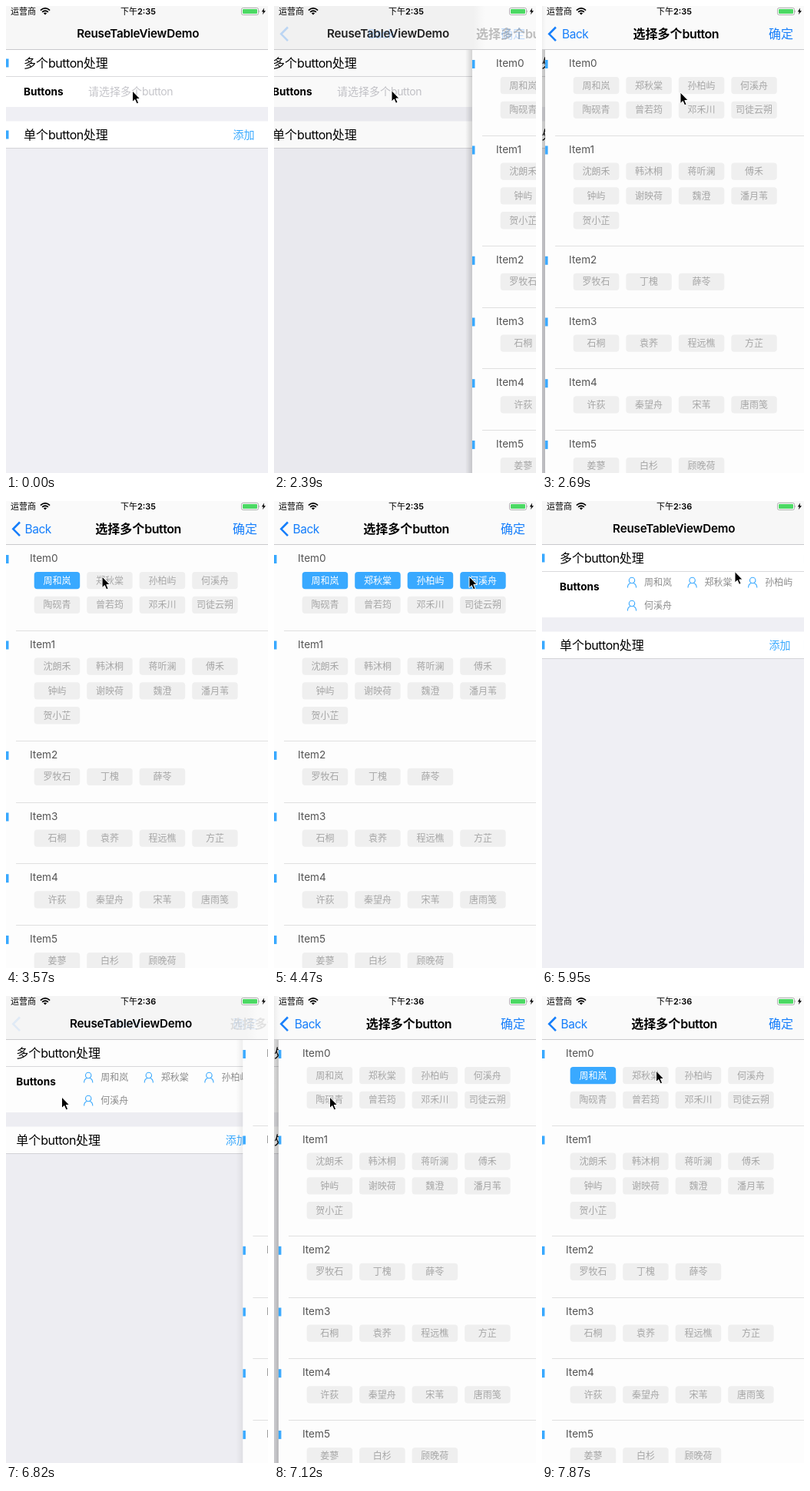
Write an HTML page that moves like this. It is 341 by 606 pixels and loops after 8 s.

```html
<!DOCTYPE html>
<html lang="zh-CN">
<head>
<meta charset="utf-8">
<title>ReuseTableViewDemo</title>
<style>
  html, body { margin: 0; width: 100%; height: 100%; overflow: hidden; background: #efeff4; }
  svg { display: block; width: 100vw; height: 100vh; }
  text { font-family: Inter, "Noto Sans CJK SC", "Noto Sans CJK", sans-serif; white-space: pre; }
  .tight { letter-spacing: -.03em; }
  .chip rect { fill: #efefef; }
  .chip text { fill: #a6a6a6; }
  .chip.on rect { fill: #39a9ff; }
  .chip.on text { fill: #fff; }
</style>
</head>
<body>
<svg id="stage" viewBox="0 0 341 606" preserveAspectRatio="none"></svg>
<script>
const W = 341, H = 606, LOOP = 8000;
const SKY = '#39a9ff', TINT = '#157efb';

const SECTIONS = [
  ['周和岚', '郑秋棠', '孙柏屿', '何溪舟', '陶砚青', '曾若筠', '邓禾川', '司徒云朔'],
  ['沈朗禾', '韩沐桐', '蒋听澜', '傅禾', '钟屿', '谢映荷', '魏澄', '潘月苇', '贺小芷'],
  ['罗牧石', '丁槐', '薛苓'],
  ['石桐', '袁荞', '程远樵', '方芷'],
  ['许荻', '秦望舟', '宋苇', '唐雨笺'],
  ['姜蓼', '白杉', '顾晚荷']
];

// The screen refreshes at a fixed rate, so motion is sampled in steps
const TICK = 148, PHASE = 7;
const PUSH = 2324, POP = 5245, PUSH_AGAIN = 6787, MINUTE = 5030;
const FIRST_TAP = 3260, SECOND_TAP = 7550, TAP_GAP = 390;

// Pointer moves: start, end, and where it comes to rest
const HOME_POINT = [164.5, 110];
const MOVES = [
  [560, 740, 153, 109.5],
  [2390, 2660, 180, 112],
  [2700, 3130, 62, 98],
  [3270, 4150, 254, 98],
  [4460, 4910, 309, 35],
  [5500, 5900, 251, 91.5],
  [5930, 6500, 72.5, 131],
  [7120, 7420, 62, 98],
  [7560, 7850, 148.5, 97]
];

const rect = (x, y, w, h, fill, extra = '') =>
  `<rect x="${x}" y="${y}" width="${w}" height="${h}" fill="${fill}" ${extra}/>`;
const text = (x, mid, size, fill, body, extra = '') =>
  `<text x="${x}" y="${mid + size * .36}" font-size="${size}" fill="${fill}" ${extra}>${body}</text>`;
const group = (id, body) => `<g id="${id}">${body}</g>`;
const latin = s => `<tspan class="tight">${s}</tspan>`;
const marker = y => rect(0, y, 3.5, 11, SKY);
const middle = 'text-anchor="middle"';

const person = (x, y) =>
  `<g transform="translate(${x} ${y})" fill="none" stroke="${SKY}" stroke-width="1.1">
    <circle cy="-3" r="3.7"/><path d="M-5.6 6.4C-5.6 2.6-3.6 1-1.8.4M1.8.4C3.6 1 5.6 2.6 5.6 6.4"/></g>`;

function picked() {
  return SECTIONS[0].slice(0, 4).map((name, i) => {
    const x = 117 + i % 3 * 78.6, y = 106 + (i / 3 | 0) * 30;
    return person(x, y) + text(x + 16, y, 12, '#8c8c8c', name);
  }).join('');
}

function home() {
  const title = (y, first) => marker(y - 6) + text(23, y, 16, '#000', first + latin('button') + '处理');
  return rect(0, 0, W, H, '#efeff4') +
    rect(0, 56, W, 75, '#fff') + rect(0, 91, W, 1, '#d9d9dc') + title(74.5, '多个') +
    group('tall', rect(0, 130, W, 21, '#fff') + picked()) +
    text(23, 111, 13.6, '#000', 'Buttons', 'font-weight="700"') +
    group('hint', text(107, 111, 14, '#c5c5ca', '请选择多个' + latin('button'))) +
    group('single', rect(0, 149.5, W, 35, '#fff') + rect(0, 184, W, 1, '#d4d4d8') +
      title(167.5, '单个') + text(295.5, 167, 14, SKY, '添加')) +
    rect(0, 0, W, H, '#000', 'id="dim"');
}

function picker() {
  let top = 56.3;
  let out = rect(-9, 0, 9, H, 'url(#shade)', 'id="shadow"') + rect(0, 0, W, H, '#fdfdfd');
  SECTIONS.forEach((names, s) => {
    if (s) out += rect(13, Math.round(top - .25), W - 13, 1, '#e0e0e0');
    out += marker(top + 13.7) + text(31, top + 18, 13.6, '#555', 'Item' + s);
    names.forEach((name, i) => {
      const x = 36.7 + i % 4 * 68.5, y = top + 35.7 + (i / 4 | 0) * 31.8;
      out += `<g class="chip"><rect x="${x}" y="${y}" width="59.5" height="22.3" rx="4"/>` +
        text(x + 29.7, y + 11.2, 12, '', name, middle) + '</g>';
    });
    top += 47.9 + 31.8 * Math.ceil(names.length / 4);
  });
  return out;
}

function bar() {
  const bold = `${middle} font-weight="600"`;
  return rect(0, 0, W, 56, '#f7f7f7') + rect(0, 0, W, 56, '#000', 'id="barDim"') +
    group('barPage', rect(-14, 0, 14.5, 56, 'url(#feather)') + rect(0, 0, W, 56, '#fafafa')) +
    rect(0, 56, W, 1, '#c9c9cc') +
    group('oldTitle', text(171.7, 36, 15.2, '#000', 'ReuseTableViewDemo', bold + ' letter-spacing="-.2"')) +
    group('newTitle', text(172, 36, 16, '#000', '选择多个' + latin('button'), bold)) +
    group('back', text(24.5, 36, 15.5, TINT, 'Back', 'class="tight"')) +
    group('actions', `<path d="M18 27.5 9.3 36.3 18 45.1" fill="none" stroke="${TINT}" stroke-width="2.6"/>` +
      text(295, 36, 16, TINT, '确定'));
}

function status() {
  return text(6, 7, 11, '#000', '运营商') +
    `<path d="M44.9 5.6Q51 .2 57.1 5.6M47.1 7.9Q51 4.6 54.9 7.9" fill="none" stroke="#000" stroke-width="1.7"/>
    <path d="M51 11.4 48.8 9.2Q51 7.6 53.2 9.2Z"/>` +
    text(149, 7, 11, '#000', '下午<tspan id="clock" font-weight="600">2:35</tspan>', 'font-weight="500"') +
    `<rect x="306.5" y="2.5" width="22" height="9" rx="2" fill="#fff" stroke="#9b9b9b" stroke-width=".8"/>
    <rect x="308" y="4" width="19" height="6" rx="1" fill="#4cd964"/>
    <path d="M329.5 5.3Q331 7 329.5 8.7Z" fill="#9b9b9b"/>
    <path d="M336 2.5 332.8 7.4H335L333.8 11.3 338 6.2H335.6Z"/>`;
}

const fade = (id, color, to) => `<linearGradient id="${id}">
  <stop stop-color="${color}" stop-opacity="0"/><stop offset="1" stop-color="${color}" stop-opacity="${to}"/></linearGradient>`;

document.getElementById('stage').innerHTML =
  `<defs>${fade('shade', '#000', .16)}${fade('feather', '#fafafa', 1)}</defs>` +
  group('home', home()) + group('picker', picker()) + group('bar', bar()) + status() +
  group('pointer', `<path d="M0 0V14.6L3.3 11.5 5.6 16.8 8.1 15.7 5.8 10.5H10.2Z"
    fill="#000" stroke="#fff" stroke-width="1" stroke-linejoin="round"/>`);

const el = id => document.getElementById(id);
const chips = [...document.querySelectorAll('.chip')];
const clamp = v => Math.min(1, Math.max(0, v));
const move = (id, x, y = 0) => el(id).setAttribute('transform', `translate(${x} ${y})`);
const opacity = (id, value) => el(id).setAttribute('opacity', clamp(value));

// Critically damped spring falling from 1 to 0
function spring(ms) {
  const k = Math.max(0, ms) * .0185;
  return (1 + k) * Math.exp(-k);
}

function pageLeft(t) {
  if (t < POP) return spring(t - PUSH);
  return t < PUSH_AGAIN ? 1 - spring(t - POP) : spring(t - PUSH_AGAIN);
}

function pointerAt(t) {
  return MOVES.reduce(([x, y], [from, to, toX, toY]) => {
    const p = clamp((t - from) / (to - from));
    return [x + (toX - x) * p, y + (toY - y) * p];
  }, HOME_POINT);
}

function draw(now) {
  const t = PHASE + Math.floor((now % LOOP - PHASE) / TICK) * TICK;
  const left = pageLeft(t), shown = 1 - left, filled = t >= POP;

  move('home', -.3 * W * shown);
  move('picker', W * left);
  opacity('dim', .1 * shown);
  opacity('shadow', 4 * shown);
  opacity('tall', +filled);
  opacity('hint', +!filled);
  move('single', 0, filled ? 20 : 0);

  opacity('barDim', .1 * shown);
  move('barPage', W * left * 1.06);
  move('oldTitle', -95 * shown);
  opacity('oldTitle', 1.2 * left - .04);
  move('newTitle', 194 * left);
  opacity('newTitle', shown);
  move('back', 129 * left);
  opacity('back', shown);
  opacity('actions', shown);

  const firstTap = t < PUSH_AGAIN ? FIRST_TAP : SECOND_TAP;
  chips.forEach((chip, i) => chip.classList.toggle('on', i < 4 && t >= firstTap + i * TAP_GAP));
  el('clock').textContent = t < MINUTE ? '2:35' : '2:36';
  move('pointer', ...pointerAt(t));
}

const start = performance.now();
function tick() {
  draw(performance.now() - start);
  requestAnimationFrame(tick);
}
tick();
</script>
</body>
</html>
```
